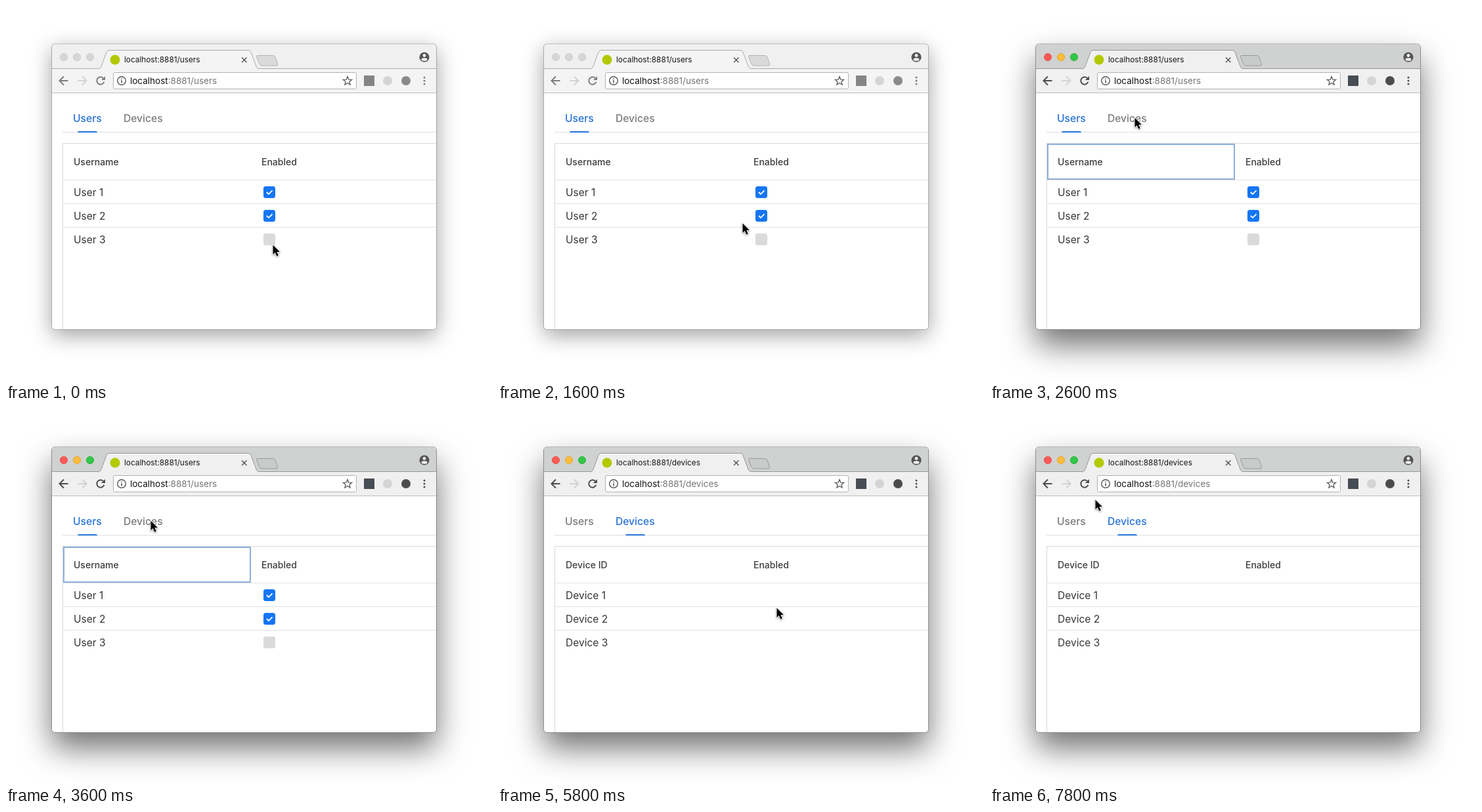
An HTML page with a canvas for the animation above (8 s loop, 740 by 572 pixels).

```html
<!DOCTYPE html>
<html lang="en">
<head>
<meta charset="utf-8">
<title>Users and devices</title>
<style>
  html, body { margin: 0; width: 100%; height: 100%; overflow: hidden; background: #fff; }
  canvas { display: block; }
</style>
</head>
<body>
<canvas id="stage" width="740" height="572"></canvas>
<script>
const ctx = document.getElementById('stage').getContext('2d');
const LOOP = 8000, STEP = 200;
const FOCUS_AT = 2600, SWITCH_AT = 3800;
const BLUE = '#2673da';

// Pointer waypoints: time, x, y
const path = [
  [0, 406, 364], [200, 405, 374], [400, 408, 340], [800, 409, 261],
  [1200, 406, 352], [1400, 404, 372], [1800, 340, 290], [2200, 232, 184],
  [2400, 220, 170], [3800, 220, 170], [4400, 458, 258], [4800, 448, 330],
  [5200, 430, 380], [5800, 424, 303], [6200, 432, 370], [6600, 436, 408],
  [7000, 402, 366], [7200, 393, 342], [7800, 160, 138], [8000, 160, 138]
];

function pointerAt(t) {
  let i = 1;
  while (i < path.length - 1 && path[i][0] <= t) i++;
  const [t0, x0, y0] = path[i - 1], [t1, x1, y1] = path[i];
  const k = (t - t0) / (t1 - t0);
  const e = k * k * (3 - 2 * k);
  return [x0 + (x1 - x0) * e, y0 + (y1 - y0) * e];
}

function text(str, x, y, size, color, weight = 400) {
  ctx.font = `${weight} ${size}px Inter, Roboto, sans-serif`;
  ctx.fillStyle = color;
  ctx.fillText(str, x, y);
  return x + ctx.measureText(str).width;
}

function rect(x, y, w, h, color) {
  ctx.fillStyle = color;
  ctx.fillRect(x, y, w, h);
}

function round(x, y, w, h, r, fill, stroke) {
  ctx.beginPath();
  ctx.roundRect(x, y, w, h, r);
  paint(fill, stroke);
}

function circle(x, y, r, fill, stroke, width) {
  ctx.beginPath();
  ctx.arc(x, y, r, 0, Math.PI * 2);
  paint(fill, stroke, width);
}

function poly(points, fill, stroke, width, close = true) {
  ctx.beginPath();
  points.forEach(([x, y]) => ctx.lineTo(x, y));
  if (close) ctx.closePath();
  paint(fill, stroke, width);
}

function paint(fill, stroke, width = 1) {
  if (fill) { ctx.fillStyle = fill; ctx.fill(); }
  if (stroke) { ctx.strokeStyle = stroke; ctx.lineWidth = width; ctx.stroke(); }
}

function frameShape(active) {
  ctx.save();
  ctx.shadowColor = active ? 'rgba(0,0,0,.56)' : 'rgba(0,0,0,.38)';
  ctx.shadowBlur = active ? 48 : 33;
  ctx.shadowOffsetY = active ? 24 : 9;
  round(70, 58, 585, 435, 5, '#fff');
  ctx.restore();
  round(69.5, 58, 586, 435.5, 5, '#fff', active ? '#8c8c8c' : '#a8a8a8');
}

function arrow(x, dir, color) {
  poly([[x - dir * 6.5, 114], [x + dir * 6, 114]], null, color, 2, false);
  poly([[x, 107.5], [x + dir * 6.5, 114], [x, 120.5]], null, color, 2, false);
}

function reload(x, y, color) {
  ctx.beginPath();
  ctx.arc(x, y, 5.7, 0.35, Math.PI * 1.75);
  paint(null, color, 2);
  poly([[x + 7, y - 7], [x + 7, y - 1], [x + 1, y - 1]], color);
}

function star(x, y) {
  const pts = [];
  for (let i = 0; i < 10; i++) {
    const a = -Math.PI / 2 + i * Math.PI / 5, r = i % 2 ? 3 : 7;
    pts.push([x + r * Math.cos(a), y + 0.5 + r * Math.sin(a)]);
  }
  poly(pts, null, '#5c5c5c', 1.3);
}

function avatar(x, y) {
  circle(x, y, 7.6, '#555');
  circle(x, y - 2.5, 2.4, '#f0f0f0');
  ctx.beginPath();
  ctx.ellipse(x, y + 3.5, 4.5, 2.3, 0, 0, Math.PI * 2);
  paint('#f0f0f0');
}

function chrome(active, page) {
  const bar = active ? '#d0d2d1' : '#f0f0f0';
  const tool = active ? '#f0f0f0' : '#f4f4f4';
  const edge = active ? '#969696' : '#ababab';
  const icon = active ? '#4c4c4c' : '#7d7d7d';

  rect(70, 58, 585, 38, bar);
  rect(70, 96, 585, 36, tool);
  rect(70, 95, 585, 1, edge);
  rect(70, 132, 585, 1, '#bcbcbc');

  const lights = active ? ['#fb5b54', '#fbbd3c', '#32c748'] : Array(3).fill('#d6d6d6');
  const rims = active ? ['#e2463f', '#dfa123', '#22ac34'] : Array(3).fill('#c8c8c8');
  lights.forEach((c, i) => circle(88 + i * 20, 78, 5.6, c, rims[i], 0.8));

  // Browser tab
  ctx.beginPath();
  ctx.moveTo(141, 96);
  ctx.quadraticCurveTo(144, 95, 145, 92);
  ctx.lineTo(153, 70.5);
  ctx.quadraticCurveTo(154, 67.5, 157, 67.5);
  ctx.lineTo(369, 67.5);
  ctx.quadraticCurveTo(372, 67.5, 373, 70.5);
  ctx.lineTo(381, 92);
  ctx.quadraticCurveTo(382, 95, 385, 96);
  paint(tool, edge);
  rect(142, 95.5, 242, 1, tool);

  ctx.beginPath();
  ctx.moveTo(383, 75.5);
  ctx.lineTo(406, 75.5);
  ctx.quadraticCurveTo(409, 75.5, 410, 78);
  ctx.lineTo(413.5, 88);
  ctx.quadraticCurveTo(414.5, 91, 412, 91);
  ctx.lineTo(390, 91);
  ctx.quadraticCurveTo(387, 91, 386, 88.5);
  ctx.lineTo(381.5, 77.5);
  ctx.quadraticCurveTo(381, 75.5, 383, 75.5);
  paint(active ? '#c9cbca' : '#dadada', active ? '#999' : '#b3b3b3');

  circle(166, 82, 7.5, '#b2c900');
  text('localhost:8881/' + page, 180, 86.3, 11.8, '#161616');
  poly([[359, 78.5], [366.5, 86]], null, '#555', 1.5, false);
  poly([[366.5, 78.5], [359, 86]], null, '#555', 1.5, false);
  avatar(637, 78);

  // Toolbar
  arrow(88, -1, icon);
  arrow(116, 1, '#d2d2d2');
  reload(144, 114, icon);
  round(163.5, 101.5, 370, 25, 2, '#fff', '#b2b2b2');
  circle(176, 114, 6.3, null, '#555', 1.4);
  rect(175.25, 110.3, 1.5, 1.6, '#555');
  rect(175.25, 113, 1.5, 4.5, '#555');
  const x = text('localhost', 189, 119, 13.5, '#111');
  text(':8881/' + page, x, 119, 13.5, '#757575');
  star(520, 114);

  rect(545, 106, 16, 16, active ? '#474d55' : '#858585');
  circle(581, 114, 7, '#d5d5d5');
  circle(609, 114, 7, active ? '#4c4c4c' : '#8a8a8a');
  for (let i = -1; i < 2; i++) circle(637, 114 + i * 5, 1.5, icon);
}

function checkbox(x, y, on) {
  round(x, y, 18, 18, 3.5, on ? '#1676f3' : '#dadada');
  if (on) poly([[x + 5, y + 9], [x + 8, y + 12], [x + 13.5, y + 6.3]], null, '#fff', 1.8, false);
}

function content(devices, focused) {
  text('Users', 102, 177, 15.7, devices ? '#7b7b7b' : BLUE, 500);
  text('Devices', 179, 177, 15.6, devices ? BLUE : '#7b7b7b', 500);
  rect(86, 192, 569, 1, '#dfdfdf');
  round(devices ? 194 : 109, 191, 30, 2, [2, 2, 0, 0], BLUE);

  rect(86, 209, 569, 1, '#d9d9d9');
  rect(86, 209, 1, 284, '#d9d9d9');
  for (const y of [265, 301, 337]) rect(87, y, 568, 1, '#e3e3e3');

  text(devices ? 'Device ID' : 'Username', 103, 243, 14, '#3b3d40', 500);
  text('Enabled', 389, 243, 14, '#3b3d40', 500);
  for (let i = 0; i < 3; i++) {
    const y = 275 + i * 36;
    text(`${devices ? 'Device' : 'User'} ${i + 1}`, 103, y + 15, 15.5, '#333538');
    if (!devices) checkbox(392, y, i < 2);
  }
  if (focused) {
    ctx.strokeStyle = '#8fb0dc';
    ctx.lineWidth = 2;
    ctx.strokeRect(88, 211, 284, 53);
  }
}

function pointer([x, y]) {
  ctx.save();
  ctx.translate(x, y);
  ctx.shadowColor = 'rgba(0,0,0,.35)';
  ctx.shadowBlur = 3;
  ctx.shadowOffsetY = 1;
  const shape = [[0.5, 0.5], [0.5, 15], [3.8, 12], [6.2, 17.5], [8.8, 16.4], [6.4, 11], [11, 11]];
  poly(shape, '#fff', '#fff', 1.6);
  ctx.shadowColor = 'transparent';
  poly(shape, '#000');
  ctx.restore();
}

function draw(t) {
  const active = t >= FOCUS_AT, devices = t >= SWITCH_AT;
  rect(0, 0, 740, 572, '#fff');
  frameShape(active);
  ctx.save();
  ctx.beginPath();
  ctx.roundRect(70, 58.5, 585, 434.5, 5);
  ctx.clip();
  chrome(active, devices ? 'devices' : 'users');
  content(devices, active && !devices);
  ctx.restore();
  pointer(pointerAt(t));
}

const start = performance.now();
function tick() {
  const t = (performance.now() - start) % LOOP;
  draw(Math.floor(t / STEP) * STEP);
  requestAnimationFrame(tick);
}
tick();
</script>
</body>
</html>
```
